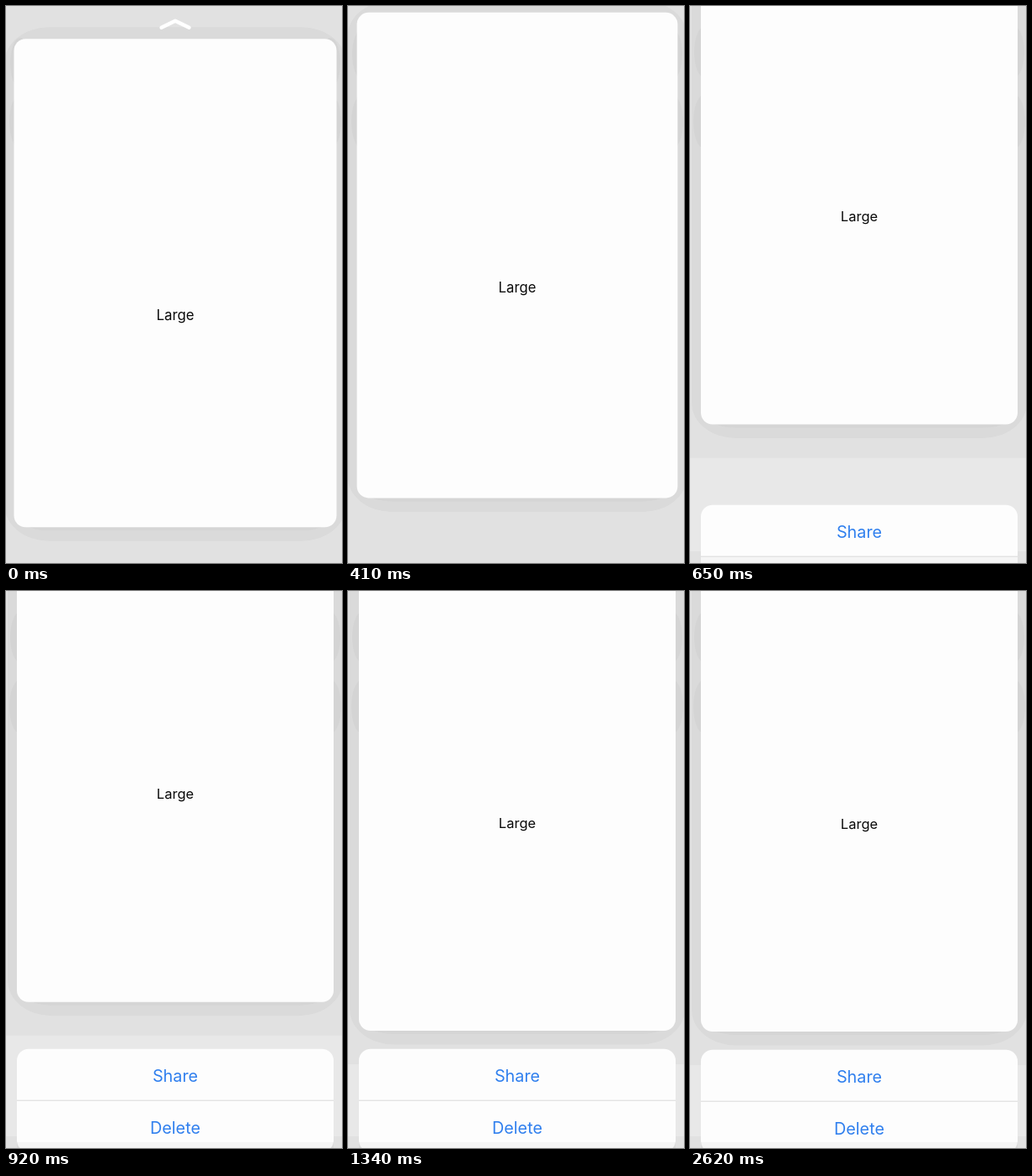
Write an HTML page that moves like this. It is 401 by 665 pixels and loops after 3160 ms.

```html
<!DOCTYPE html>
<html lang="en">
<head>
<meta charset="utf-8">
<title>Card with action menu</title>
<style>
html, body { margin: 0; width: 100%; height: 100%; overflow: hidden; background: #e1e1e1; }
svg { display: block; width: 401px; height: 665px; }
text { font-family: Inter, "Liberation Sans", sans-serif; font-optical-sizing: none; text-anchor: middle; }
.link { font-size: 19.8px; fill: #2f7fee; }
</style>
</head>
<body>
<svg viewBox="0 0 401 665">
  <rect width="401" height="665" fill="#e1e1e1"/>
  <rect id="light" x="-20" width="441" rx="16" fill="#e8e8e8"/>
  <rect id="halo" rx="53" ry="42" fill="#dadada"/>
  <rect id="shade" rx="40" ry="22" fill="#d5d5d5"/>
  <g id="upper" fill="#d4d4d4">
    <ellipse cx="17" rx="12" ry="30"/>
    <ellipse cx="387" rx="12" ry="30"/>
  </g>
  <g fill="#d4d4d4">
    <ellipse cx="17" cy="138" rx="13" ry="32"/>
    <ellipse cx="387" cy="138" rx="13" ry="32"/>
  </g>
  <path id="chevron" d="M-16.5 0 L0 -8 L16.5 0" fill="none" stroke="#fff" stroke-width="4.4" stroke-linecap="round" stroke-linejoin="round"/>
  <rect id="card" rx="14" fill="#fdfdfd"/>
  <text id="label" x="202" fill="#0a0a0a">Large</text>
  <g id="menu">
    <rect x="13" width="378" height="123" rx="14" fill="#fdfdfd"/>
    <rect x="13" y="61" width="378" height="1" fill="#d9d9d9"/>
    <text class="link" x="202" y="39">Share</text>
    <text class="link" x="202" y="101">Delete</text>
    <rect id="edge" x="13" width="378" height="8" fill="#000" opacity=".03"/>
  </g>
</svg>
<script>
const LOOP = 3160, MID = 202, RATIO = 1.5145;
// the picture holds still between these moments
const ticks = [0, 180, 300, 410, 560, 650, 770, 920, 1040, 1190, 1340, 1580, 1820];

const set = (id, attrs) => {
  const node = document.getElementById(id);
  for (const k in attrs) node.setAttribute(k, attrs[k]);
};

function ease(t, from, to) {
  const u = Math.min(1, Math.max(0, (t - from) / (to - from)));
  return u * u * (3 - 2 * u);
}

const box = (x, y, r, b) => ({ x, y, width: r - x, height: b - y });

function draw(time) {
  const t = ticks.findLast(tick => tick <= time);

  // lift and shrink, drag up past the menu gap, spring back, settle
  const width = 385 + 2.5 * ease(t, 0, 300) - 9.5 * ease(t, 300, 520);
  const settle = ease(t, 1340, 1820);
  const bottom = 622.3 - 143.3 * ease(t, 235, 780) + 46 * ease(t, 850, 1062) + settle;
  const menuTop = 700 - 153.3 * ease(t, 452, 770) + settle;

  const left = MID - width / 2, right = MID + width / 2;
  const top = bottom - width * RATIO, scale = width / 378;

  set("card", box(left, top, right, bottom));
  set("halo", box(left - 11, top - 14, right + 11, bottom + 16.5));
  set("shade", box(left + 1, top + 6, right - 1, bottom + 4));
  set("upper", { transform: `translate(0 ${55 + Math.max(0, top) / 3})` });
  set("chevron", { transform: `translate(${MID} ${top - 13.5})` });
  set("label", { y: bottom - 242.5 * scale, "font-size": 16.5 * scale });

  set("light", { y: bottom + 40, height: menuTop < 665 ? 611 - bottom : 0 });
  set("menu", { transform: `translate(0 ${menuTop})` });
  set("edge", { y: Math.max(0, 658 - menuTop) });
}

let origin;
function frame(now) {
  origin ??= now;
  draw((now - origin) % LOOP);
  requestAnimationFrame(frame);
}
draw(0);
requestAnimationFrame(frame);
</script>
</body>
</html>
```
